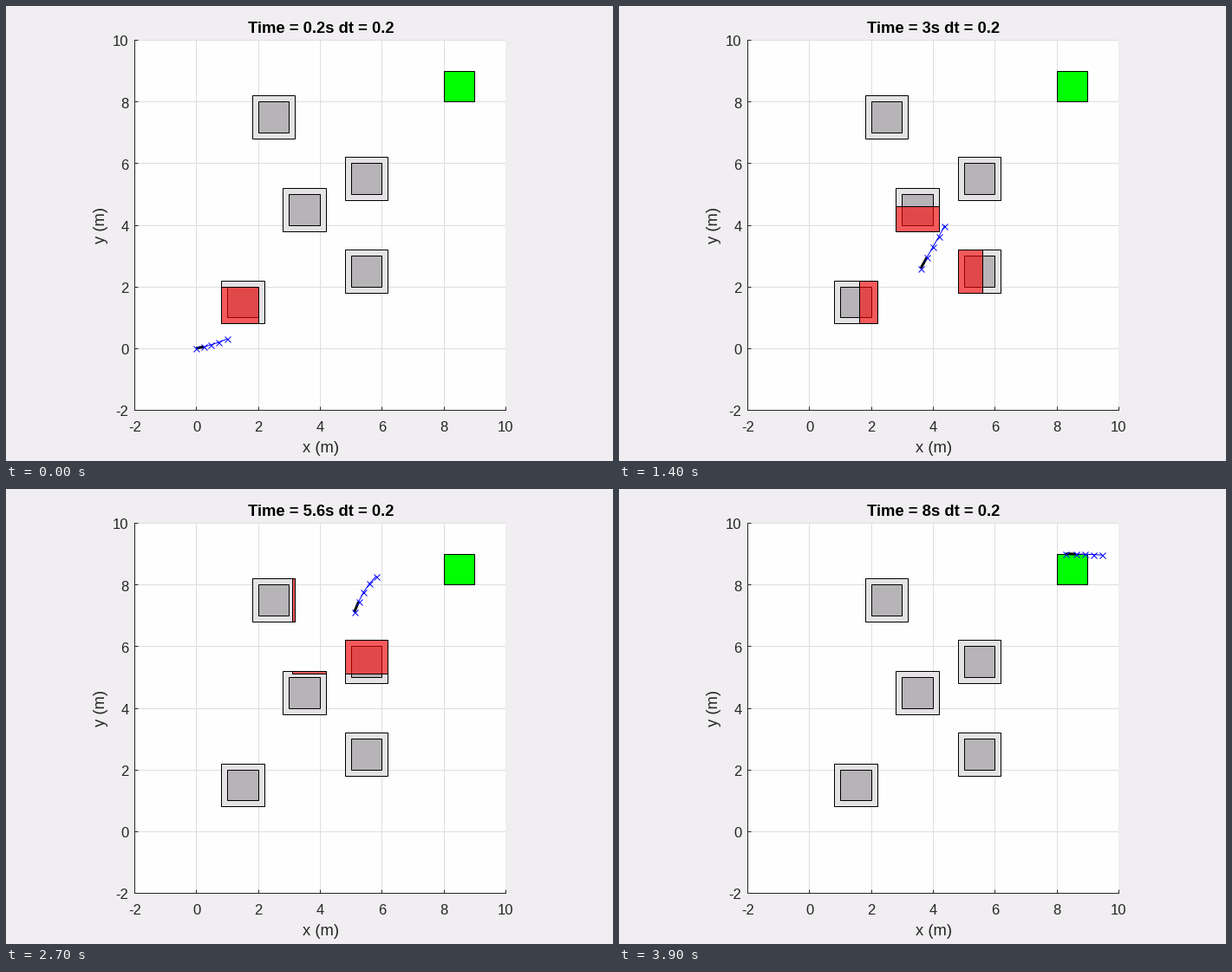
Write a matplotlib script that moves like this. It is 700x525 px and loops after 4 s.

```python
import numpy as np
import matplotlib.pyplot as plt
from matplotlib.animation import FuncAnimation
from matplotlib.patches import Rectangle

W, H, DPI = 700, 525, 100
FRAMES, INTERVAL = 40, 100
DT, HORIZON, RANGE, PAD = 0.2, 4, 2.0, 0.2
LEFT, TOP, WIDTH, HEIGHT = 148.02, 39.1, 428, 427  # plot area in pixels
DARK = "#262626"
PX = 72 / DPI  # points per pixel

OBSTACLES = [(1.5, 1.5), (3.5, 4.5), (5.5, 2.5), (5.5, 5.5), (2.5, 7.5)]
GOAL = (8.5, 8.5)

# Robot position at every fifth step
SPACING = 5
WAYPOINTS = np.array([
    (0, 0), (1.26, .42), (2.76, 1.32), (3.8, 2.94), (4.67, 4.67),
    (4.89, 6.41), (5.6, 8.03), (6.91, 8.92), (8.62, 8.99), (9.95, 8.9),
])


def smooth_path(points, t):
    """Cubic Hermite curve through evenly timed points."""
    slope = np.gradient(points, axis=0, edge_order=2)
    i = np.minimum(t.astype(int), len(points) - 2)
    u = (t - i)[:, None]
    v = 1 - u
    return (v * v * ((1 + 2 * u) * points[i] + u * slope[i])
            + u * u * ((1 + 2 * v) * points[i + 1] - v * slope[i + 1]))


PATH = smooth_path(WAYPOINTS, np.arange(FRAMES + HORIZON) / SPACING)

plt.rcParams["font.family"] = "Liberation Sans"
fig = plt.figure(figsize=(W / DPI, H / DPI), dpi=DPI, facecolor="#f0eef0")
ax = fig.add_axes([LEFT / W, 1 - (TOP + HEIGHT) / H, WIDTH / W, HEIGHT / H],
                  facecolor="#fefefe")
ax.set(xlim=(-2, 10), ylim=(-2, 10))
ticks = range(-2, 11, 2)
ax.set_xticks(ticks, [])
ax.set_yticks(ticks, [])
ax.set_axisbelow(True)
ax.grid(color="#dedee0", lw=PX)
ax.tick_params(direction="in", length=4.3 * PX, width=PX, color=DARK)
ax.spines[["top", "right"]].set_visible(False)
ax.spines[["left", "bottom"]].set(color=DARK, linewidth=PX)


def label(x, y, text, size=18.33, **style):
    """Text with its baseline at stage pixel (x, y), y downwards."""
    style = {"color": DARK, "ha": "center", "va": "baseline", **style}
    return fig.text(x / W, 1 - y / H, text, fontsize=size * PX, **style)


for n in ticks:
    part = (n + 2) / 12
    label(LEFT + part * WIDTH + 0.3, 491, str(n), 16.67)
    label(141.5, TOP + (1 - part) * HEIGHT + 7.3, str(n), 16.67, ha="right")
label(363, 515, "x (m)")
label(110, 253, "y (m)", rotation=90, va="center")
title = label(363, 31, "", weight="bold", color="black")


def square(center, half, color, z):
    corner = np.subtract(center, half)
    return ax.add_patch(Rectangle(corner, 2 * half, 2 * half, facecolor=color,
                                  edgecolor="black", lw=PX, zorder=z))


square(GOAL, 0.5, "#00ff00", 2)
seen = []
for spot in OBSTACLES:
    square(spot, 0.5 + PAD, "#e4e2e4", 2)
    square(spot, 0.5, "#b6b4b6", 3)
    seen.append(square(spot, 0.5 + PAD, (1, 0, 0, 0.6), 4))

plan, = ax.plot([], [], color="blue", lw=PX, zorder=5)
body, = ax.plot([], [], color="black", lw=3 * PX, zorder=6,
                solid_capstyle="butt")
marks, = ax.plot([], [], "x", color="blue", ms=7 * PX, mew=PX, zorder=7)


def draw(k):
    pts = PATH[k:k + HORIZON + 1]
    plan.set_data(*pts.T)
    marks.set_data(*pts.T)
    body.set_data(*pts[:2].T)
    # Red marks the part of each padded obstacle within sensor range
    for spot, patch in zip(OBSTACLES, seen):
        lo = np.maximum(np.subtract(spot, 0.5 + PAD), pts[0] - RANGE)
        hi = np.minimum(np.add(spot, 0.5 + PAD), pts[0] + RANGE)
        patch.set_visible(bool(np.all(hi > lo)))
        patch.set_bounds(*lo, *(hi - lo))
    title.set_text(f"Time = {(k + 1) * DT:g}s dt = {DT:g}")
    return [plan, marks, body, title, *seen]


anim = FuncAnimation(fig, draw, frames=FRAMES, interval=INTERVAL,
                     repeat=True, repeat_delay=0, blit=False)
plt.show()
```
